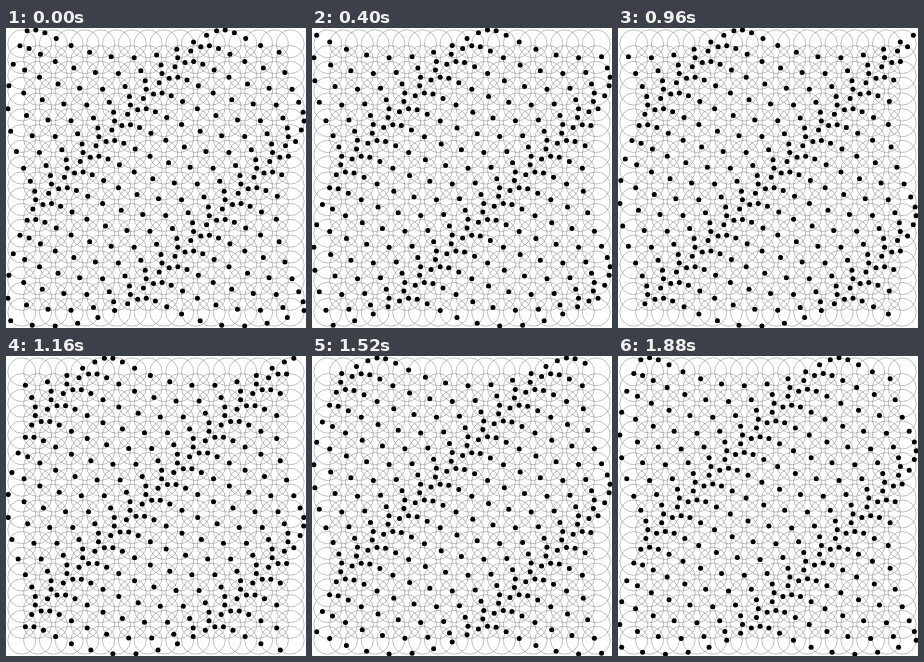
An HTML page that plays this animation: 300x300 px, repeating every 1.92 s.

```html
<!DOCTYPE html>
<html lang="en">
<head>
<meta charset="utf-8">
<title>Orbiting dots</title>
<style>
  html, body { margin: 0; width: 100%; height: 100%; overflow: hidden; background: #fff; }
  svg { display: block; width: 100vw; height: 100vh; }
  .orbit { fill: none; stroke: #808080; stroke-width: 0.5; }
  .dot { fill: #000; }
</style>
</head>
<body>
<svg id="stage" viewBox="0 0 300 300"></svg>
<script>
const COUNT = 18;
const SPACING = 300 / (COUNT + 1);
const ORBIT = 14;
const DOT = 2.5;
const STEPS = 48;
const STEP_MS = 40;
const TURN = 2 * Math.PI;

const stage = document.getElementById('stage');

function addCircle(className, cx, cy, r) {
  const circle = document.createElementNS('http://www.w3.org/2000/svg', 'circle');
  circle.setAttribute('class', className);
  circle.setAttribute('cx', cx);
  circle.setAttribute('cy', cy);
  circle.setAttribute('r', r);
  stage.appendChild(circle);
  return circle;
}

const cells = [];
for (let row = 0; row < COUNT; row++) {
  for (let col = 0; col < COUNT; col++) {
    cells.push({ x: (col + 1) * SPACING, y: (row + 1) * SPACING, phase: (col + row - 1) / 12 });
  }
}
cells.forEach(c => addCircle('orbit', c.x, c.y, ORBIT));
cells.forEach(c => { c.dot = addCircle('dot', c.x, c.y, DOT); });

// Each dot circles counterclockwise; the phase grows along the diagonal.
function draw(ms) {
  const step = Math.floor(ms / STEP_MS) % STEPS;
  for (const { x, y, phase, dot } of cells) {
    const angle = TURN * (phase + (step + 1) / STEPS);
    dot.setAttribute('cx', (x - ORBIT * Math.sin(angle)).toFixed(3));
    dot.setAttribute('cy', (y - ORBIT * Math.cos(angle)).toFixed(3));
  }
}

const start = performance.now();
function tick() {
  draw(performance.now() - start);
  requestAnimationFrame(tick);
}
tick();
</script>
</body>
</html>
```
